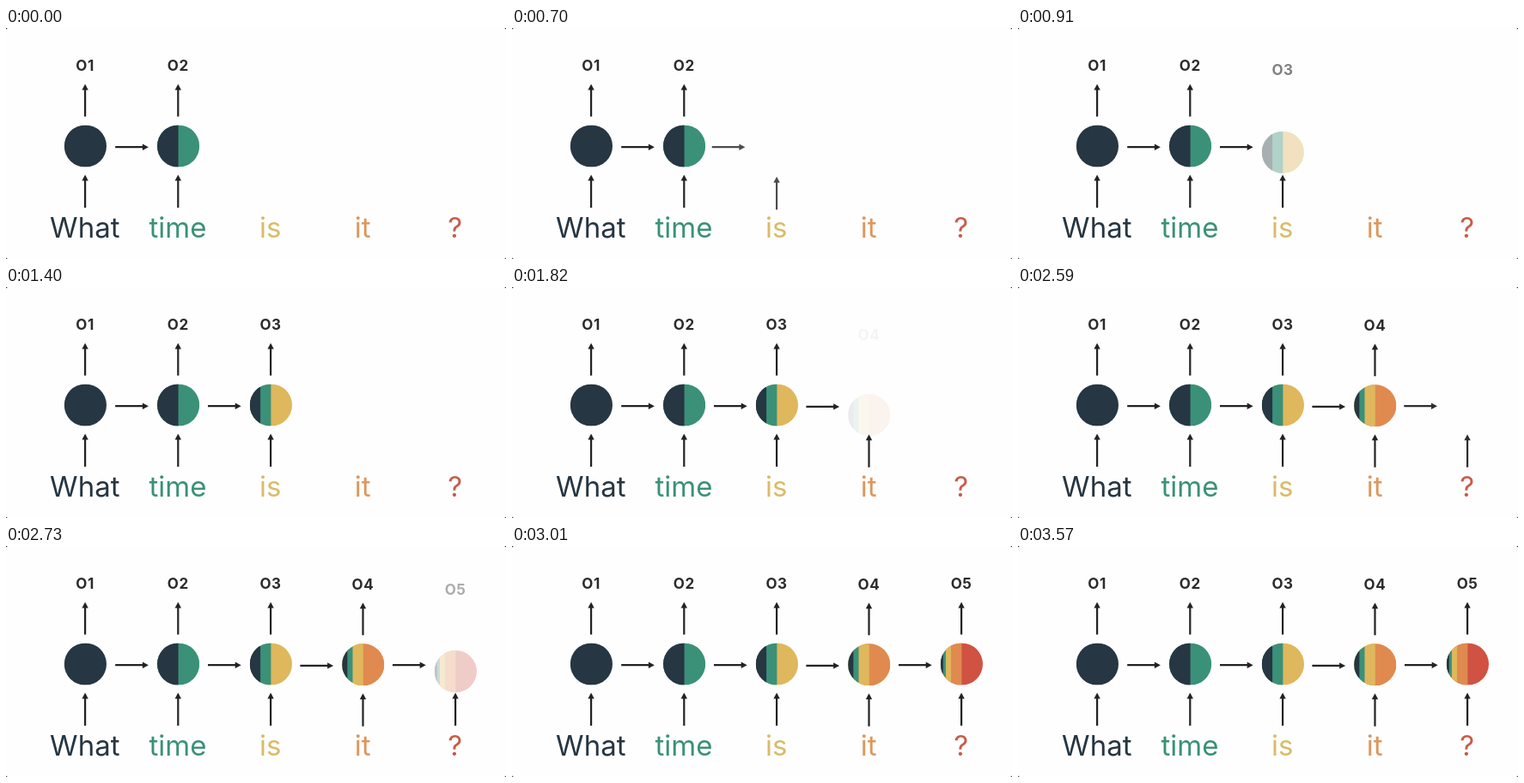
Animation of 582 by 270 pixels, one loop 3.64 s. Source, as an HTML page:

```html
<!DOCTYPE html>
<html lang="en">
<head>
<meta charset="utf-8">
<title>Recurrent network</title>
<style>
  html, body { margin: 0; width: 100%; height: 100%; overflow: hidden; background: #111; }
  svg { display: block; width: 582px; height: 270px; border-radius: 2.5px; background: #fefefe; }
  text { font-family: Inter, sans-serif; text-anchor: middle; }
  .word { font-size: 33px; font-weight: 400; }
  .label { font-size: 17px; font-weight: 700; letter-spacing: 0.5px; fill: #2b2b2b; }
  .arrow line { stroke: #222; stroke-width: 2.2; }
  .arrow path { fill: #222; }
</style>
</head>
<body>
<svg id="stage" viewBox="0 0 582 270"></svg>
<script>
const LOOP = 3640, SHIFT = 12, R = 24.6;

// x, y: column offset; ink: word colour; fill: node colour; start: build time
const columns = [
  { word: 'What', x: 92, y: 0, ink: '#263642', fill: '#263642' },
  { word: 'time', x: 200.2, y: 0, ink: '#3a9178', fill: '#3a9178' },
  { word: 'is', x: 308, y: 0, ink: '#dabb68', fill: '#dfb75c', start: 460 },
  { word: 'it', x: 415.4, y: 0.7, ink: '#dc975e', fill: '#e08a4f', start: 1450 },
  { word: '?', x: 523, y: 0, ink: '#c75c49', fill: '#d05243', start: 2305 }
];

// [delay, duration] within one column's build
const timing = {
  input: [0, 335],
  node: [310, 330],
  label: [350, 180],
  output: [500, 200]
};

const stage = document.getElementById('stage');
const parts = [];

function add(parent, tag, attrs, text) {
  const el = document.createElementNS('http://www.w3.org/2000/svg', tag);
  for (const name in attrs) el.setAttribute(name, attrs[name]);
  if (text) el.textContent = text;
  parent.appendChild(el);
  return el;
}

// Arrow pointing right from the given point, turned by angle
function arrow(parent, x, y, length, angle) {
  const g = add(parent, 'g', { class: 'arrow', transform: `translate(${x} ${y}) rotate(${angle})` });
  add(g, 'line', { x1: 0, y1: 0, x2: length - 5, y2: 0 });
  add(g, 'path', { d: `M${length} 0l-7 -3.7v7.4z` });
}

// Each earlier word keeps half the share of the one after it
function node(parent, cx, cy, index) {
  const clip = add(add(parent, 'defs', {}), 'clipPath', { id: 'disc' + index });
  add(clip, 'circle', { cx, cy, r: R });
  const g = add(parent, 'g', { 'clip-path': `url(#disc${index})` });
  for (let i = index; i >= 0; i--) {
    const width = 2 * R / 2 ** (index - i);
    add(g, 'rect', { x: cx - R, y: cy - R, width, height: 2 * R, fill: columns[i].fill });
  }
}

function part(start, kind, dx, dy) {
  const el = add(stage, 'g', {});
  if (start !== undefined) {
    const [delay, duration] = timing[kind];
    parts.push({ el, from: start + delay, duration, dx, dy });
  }
  return el;
}

columns.forEach(({ word, x, y, ink, start }, i) => {
  add(stage, 'text', { class: 'word', x: x - 0.2, y: 244.5, fill: ink }, word);
  arrow(part(start, 'input', 0, SHIFT), x + 0.1, y + 210, 38.5, -90);
  if (i) arrow(part(start, 'input', -SHIFT, 0), x - 73, y + 139.2, 38.7, 0);
  node(part(start, 'node', 0, SHIFT), x + 0.4, y + 138, i);
  add(part(start, 'label', 0, SHIFT), 'text', { class: 'label', x, y: y + 50 }, 'O' + (i + 1));
  arrow(part(start, 'output', 0, SHIFT), x + 0.1, y + 103.5, 38, -90);
});

function draw(time) {
  for (const { el, from, duration, dx, dy } of parts) {
    const p = Math.min(1, Math.max(0, (time - from) / duration));
    const ease = p * p * (3 - 2 * p);
    el.setAttribute('opacity', ease);
    el.setAttribute('transform', `translate(${dx * (1 - ease)} ${dy * (1 - ease)})`);
  }
}

const begin = performance.now();
function tick() {
  draw((performance.now() - begin) % LOOP);
  requestAnimationFrame(tick);
}
tick();
</script>
</body>
</html>
```
